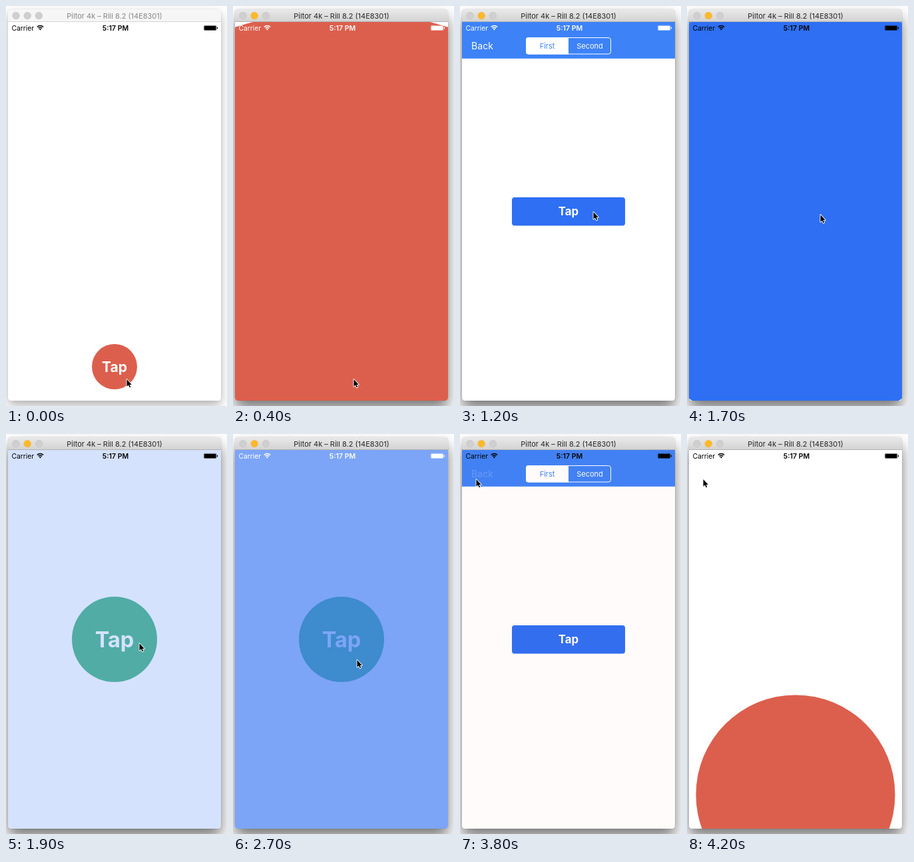
Animation of 332x600 px, one loop 4300 ms. Source, as an HTML page:

```html
<!DOCTYPE html>
<html lang="en">
<head>
<meta charset="utf-8">
<title>Circle transition</title>
<style>
  html, body { margin: 0; width: 100%; height: 100%; overflow: hidden; background: #fff; }
  #stage { position: relative; width: 332px; height: 600px; overflow: hidden; background: #fff; }
  #shadow {
    position: absolute; left: 3px; top: 5px; width: 320px; height: 587px; border-radius: 5px;
    box-shadow: 0 0 1px rgba(0,0,0,.3), 0 7px 16px rgba(0,0,0,.3);
  }
  .active #shadow { box-shadow: 0 0 1px rgba(0,0,0,.5), 0 13px 22px rgba(0,0,0,.52); }
  svg { position: absolute; left: 0; top: 0; display: block; }
  text { font-family: Inter, Roboto, sans-serif; text-anchor: middle; }
  .left { text-anchor: start; }
  .tap { font-weight: 700; fill: #fff; }
  #bar { fill: #f6f6f6; }
  .active #bar { fill: url(#metal); }
  #rule { fill: #d4d4d4; }
  .active #rule { fill: #b2b2b2; }
  #title { font-size: 11px; fill: #858585; }
  .active #title { fill: #262626; }
  .light { fill: #cfcfcf; stroke: #c2c2c2; stroke-width: .6; }
  .active #mini { fill: #fcb92c; stroke: #f5b32e; }
</style>
</head>
<body>
<div id="stage">
  <div id="shadow"></div>
  <svg width="332" height="600" viewBox="0 0 332 600">
    <defs>
      <linearGradient id="metal" x1="0" y1="0" x2="0" y2="1">
        <stop offset="0" stop-color="#e9e9e9"/>
        <stop offset="1" stop-color="#d2d2d2"/>
      </linearGradient>
      <clipPath id="window"><rect x="3" y="5" width="320" height="587" rx="4.5"/></clipPath>
      <clipPath id="screen"><rect x="3" y="24" width="320" height="568"/></clipPath>
    </defs>

    <g clip-path="url(#window)">
      <rect id="bar" x="3" y="5" width="320" height="19"/>
      <rect id="rule" x="3" y="23" width="320" height="1"/>
      <circle class="light" cx="15" cy="14.5" r="5.3"/>
      <circle class="light" id="mini" cx="32.2" cy="14.5" r="5.3"/>
      <circle class="light" cx="49.4" cy="14.5" r="5.3"/>
      <text id="title" x="163" y="18.7">Piltor 4k – Rill 8.2 (14E8301)</text>

      <g clip-path="url(#screen)">
        <rect x="3" y="24" width="320" height="568" fill="#fff"/>

        <g id="home">
          <circle cx="163" cy="541" r="34" fill="#dc5f4d"/>
          <text class="tap" id="homeTap" x="163" y="549" font-size="21">Tap</text>
        </g>

        <g id="list">
          <rect x="3" y="24" width="320" height="54.8" fill="#3d82f7"/>
          <text class="left" id="back" x="17" y="65" font-size="14.2" fill="#fff">Back</text>
          <rect x="99.5" y="47.5" width="127" height="24.5" rx="3.5" fill="none" stroke="#fff"/>
          <path d="M163 47H102.5a3.5 3.5 0 0 0-3.5 3.5v18.5a3.5 3.5 0 0 0 3.5 3.5H163z" fill="#fff"/>
          <text x="131" y="63.8" font-size="11" fill="#3d82f7">First</text>
          <text x="195" y="63.8" font-size="11" fill="#fff">Second</text>
          <rect x="78" y="287" width="170" height="42.5" rx="4" fill="#2e6ff3"/>
          <text class="tap" id="listTap" x="163" y="314.3" font-size="16.8">Tap</text>
        </g>

        <g id="round">
          <circle cx="163" cy="308" r="64" fill="#5abb91"/>
          <text class="tap" id="roundTap" x="163" y="320.2" font-size="32.5">Tap</text>
        </g>

        <circle id="bubble" cx="163"/>
      </g>

      <g id="status">
        <text class="left" x="8.5" y="36.7" font-size="10.3">Carrier</text>
        <g fill="none" stroke="currentColor" stroke-width="1.5">
          <path d="M46.7 31.4a6.5 6.5 0 0 1 9.4 0"/>
          <path d="M48.7 33.4a3.8 3.8 0 0 1 5.4 0"/>
        </g>
        <path d="M51.4 36.6l-1.6-1.8a2.3 2.3 0 0 1 3.2 0z"/>
        <text x="164.5" y="36.7" font-size="10.5" font-weight="600">5:17 PM</text>
        <rect x="297.3" y="29.3" width="18.8" height="7.2" rx="1.5" fill="none" stroke="currentColor" stroke-width=".5"/>
        <rect x="297.9" y="29.9" width="17.6" height="6" rx=".9"/>
        <path d="M317 31.500q1.300 .3 1.300 1.500t-1.300 1.500z"/>
      </g>
    </g>

    <path id="cursor" d="M.5 1V11.7L2.9 9.5L4.8 13.3L6.3 12.6L4.6 8.9H7.8Z"
          fill="#000" stroke="#fff" stroke-width="1.8" paint-order="stroke" stroke-linejoin="round"/>
  </svg>
</div>

<script>
const LOOP = 4300, STEP = 100, PHASE = 250;
const $ = id => document.getElementById(id);
const stage = $('stage'), bubble = $('bubble'), status = $('status'), cursor = $('cursor');

const red = { y: 541, min: 34, max: 545, color: '#dc5f4d' };
const blue = { y: 308, min: 30, max: 330, color: '#2e6ff3' };
const moves = [
  { at: 172, from: 'home', to: 'list', spot: red, button: 'homeTap' },
  { at: 1472, from: 'list', to: 'round', spot: blue, button: 'listTap' },
  { at: 2554, from: 'round', to: 'list', spot: blue, button: 'roundTap', closing: true },
  { at: 3777, from: 'list', to: 'home', spot: red, button: 'back', closing: true }
];

// time, x, y of the pointer tip
const path = [
  [0, 181, 559], [650, 181, 559], [1150, 200, 308], [1550, 200, 308], [1750, 200, 313],
  [1980, 200, 313], [2400, 186, 338], [3020, 186, 338], [3650, 24, 67], [LOOP, 24, 67]
];

const lerp = (a, b, k) => a + (b - a) * k;
const clamp = k => Math.min(1, Math.max(0, k));
const ease = k => { k = clamp(k); return k * k * (3 - 2 * k); };

function drawBubble(move, t) {
  const { spot, closing } = move;
  const k = (t - move.at) / PHASE;
  const grow = closing ? 1 - ease(k - 1) : ease(k);
  const alpha = closing ? ease(k) : 1 - ease(k - 1);
  bubble.setAttribute('cy', spot.y);
  bubble.setAttribute('r', lerp(spot.min, spot.max, grow));
  bubble.setAttribute('fill', spot.color);
  bubble.setAttribute('opacity', alpha);
}

function drawCursor(t) {
  const i = path.findIndex(p => p[0] > t);
  const a = path[i - 1], b = path[i];
  const k = ease((t - a[0]) / (b[0] - a[0]));
  cursor.setAttribute('transform', `translate(${lerp(a[1], b[1], k)} ${lerp(a[2], b[2], k)})`);
}

function draw(t) {
  let scene = 'home', next = 'home', running = null;
  for (const move of moves) {
    const dt = t - move.at;
    $(move.button).setAttribute('opacity', dt > -90 && dt < 40 ? 0.2 : 1);
    if (dt < 0) continue;
    next = move.to;
    scene = dt < PHASE ? move.from : move.to;
    if (dt < 2 * PHASE) running = move;
  }
  for (const id of ['home', 'list', 'round']) $(id).style.display = id === scene ? '' : 'none';

  bubble.style.display = running ? '' : 'none';
  if (running) drawBubble(running, t);

  const ink = next === 'list' ? '#fff' : '#000';
  status.style.fill = status.style.color = ink;
  stage.classList.toggle('active', t >= 100);
  drawCursor(t);
}

const start = performance.now();
function tick() {
  const t = (performance.now() - start) % LOOP;
  draw(Math.floor(t / STEP) * STEP);
  requestAnimationFrame(tick);
}
tick();
</script>
</body>
</html>
```
